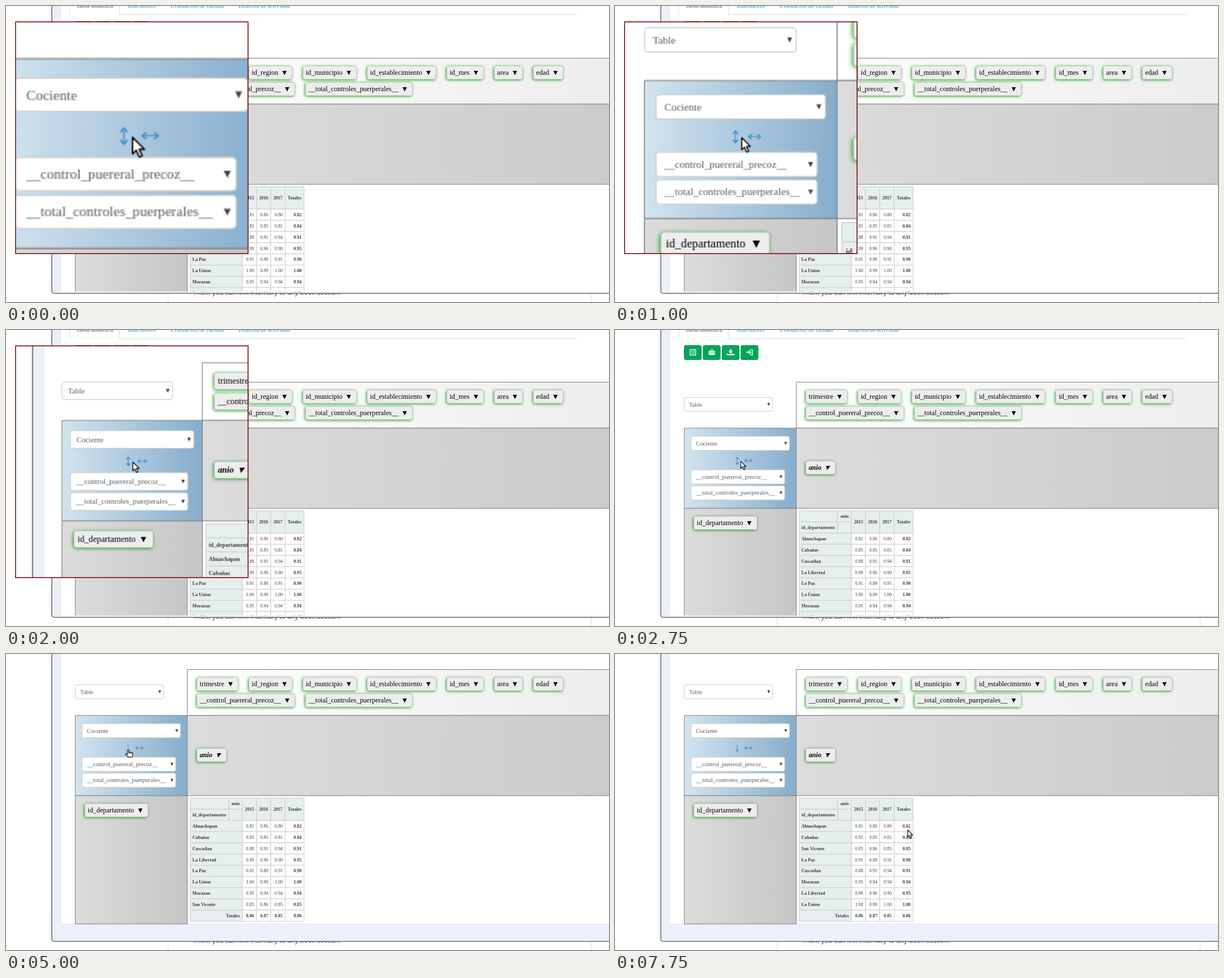
Write an HTML page with a canvas that moves like this. It is 1066 by 525 pixels and loops after 8 s.

```html
<!DOCTYPE html>
<html lang="es">
<head>
<meta charset="utf-8">
<title>Tabla dinámica</title>
<style>
  html, body { margin: 0; width: 100%; height: 100%; overflow: hidden; background: #fff; }
  canvas { display: block; }
</style>
</head>
<body>
<canvas id="stage" width="1066" height="525"></canvas>
<script>
const W = 1066, H = 525, LOOP = 8000;
const SERIF = '"Liberation Serif", "Times New Roman", serif';
const SANS = '"Liberation Sans", Arial, sans-serif';
const view = document.getElementById('stage').getContext('2d');
const page = document.createElement('canvas');
page.width = W;
page.height = H;
const c = page.getContext('2d');

// Each step: start time, then its values
const ZOOM = [[0, 2.366], [500, 2.14], [750, 1.92], [1000, 1.72], [1250, 1.4],
  [2000, 1.253], [2250, 1.1], [2750, 0]];
const POINTER = [[0, 'arrow', 222, 232.3], [3750, 'hand', 222, 228], [5000, 'hand', 210.5, 169],
  [7000, 'arrow', 400.5, 305], [7250, 'arrow', 457, 317], [7500, 'arrow', 500.5, 328.5],
  [7750, 'arrow', 517, 311.5]];

const PILLS = [
  ['trimestre', 'id_region', 'id_municipio', 'id_establecimiento', 'id_mes', 'area', 'edad'],
  ['__control_puereral_precoz__', '__total_controles_puerperales__']
];
const ROWS = [
  ['Ahuachapan', .81, .86, .80, .82], ['Cabañas', .85, .85, .81, .84],
  ['Cuscatlan', .88, .91, .94, .91], ['La Libertad', .99, .96, .90, .95],
  ['La Paz', .91, .88, .91, .90], ['La Union', 1, .99, 1, 1],
  ['Morazan', .95, .94, .94, .94], ['San Vicente', .85, .86, .85, .85]
];
const SORTED = [...ROWS].sort((a, b) => a[4] - b[4]);
const TOTALS = ['Totales', .86, .87, .85, .86];
const COLS = [418, 443, 468, 493.5, 527];

const pick = (steps, t) => steps.filter(s => s[0] <= t).pop();

function text(str, x, y, size, color, style = '', align = 'left', family = SERIF) {
  c.font = `${style} ${size}px ${family}`;
  c.fillStyle = color;
  c.textAlign = align;
  c.fillText(str, x, y);
}

function line(color, width, ...pts) {
  c.strokeStyle = color;
  c.lineWidth = width;
  c.beginPath();
  for (let i = 0; i < pts.length; i += 2) c.lineTo(pts[i], pts[i + 1]);
  c.stroke();
}

function box(x, y, w, h, fill, stroke, r = 0) {
  c.beginPath();
  c.roundRect(x, y, w, h, r);
  c.fillStyle = fill;
  c.fill();
  if (stroke) {
    c.strokeStyle = stroke;
    c.lineWidth = 1;
    c.stroke();
  }
}

function shade(x0, x1, from, to) {
  const g = c.createLinearGradient(x0, 0, x1, 0);
  g.addColorStop(0, from);
  g.addColorStop(1, to);
  return g;
}

function triangle(x, y, w, h, color, slant = 0) {
  c.fillStyle = color;
  c.beginPath();
  c.moveTo(x - w / 2 + slant, y - h / 2);
  c.lineTo(x + w / 2 + slant, y - h / 2);
  c.lineTo(x - slant, y + h / 2);
  c.fill();
}

function pill(label, x, y, style = '') {
  c.font = `${style} 12.2px ${SERIF}`;
  const tw = c.measureText(label).width, w = tw + 30.6;
  c.save();
  c.shadowColor = 'rgba(0,140,0,.95)';
  c.shadowBlur = 5;
  c.shadowOffsetX = -1;
  c.shadowOffsetY = 1;
  box(x + .5, y + .5, w - 1, 23.5, '#ededed', null, 3.5);
  c.restore();
  box(x + .5, y + .5, w - 1, 23.5, '#ededed', 'rgba(170,190,170,.6)', 3.5);
  text(label, x + 5.5, y + 16, 12.2, '#000', style);
  triangle(x + w - 14, y + 12.7, 7.6, 7.6, '#000', style ? 1 : 0);
  return w;
}

function select(label, x, y, w) {
  box(x, y, w, 25, '#fff', '#ccc', 3);
  text(label, x + 8.5, y + 16, 10.7, '#5c5c5c');
  triangle(x + w - 6.7, y + 12.7, 5.2, 5.2, '#444');
}

function sortArrow(x, y, angle, twoWay, faint) {
  c.save();
  c.globalAlpha = faint ? .35 : 1;
  c.translate(x, y);
  c.rotate(angle);
  const blue = '#3f8ec4';
  line(blue, 1.1, -6, 0, 6, 0);
  line(blue, 1.2, 3, -2.6, 6, 0, 3, 2.6);
  if (twoWay) line(blue, 1.2, -3, -2.6, -6, 0, -3, 2.6);
  c.restore();
}

function buttons() {
  const icons = [
    () => {
      c.strokeRect(-5, -5, 10, 10);
      for (let y = -2.5; y < 4; y += 2.5) line('#fff', 1.1, -3.5, y, -2.2, y), line('#fff', 1.1, -1, y, 3.6, y);
    },
    () => {
      box(-5.5, -2.5, 11, 7, '#fff', null, 1);
      c.strokeRect(-2, -4.3, 4, 2.5);
      line('#00a65a', .9, -5.5, 1, 5.5, 1);
    },
    () => {
      box(-1.5, -5.5, 3, 5, '#fff');
      triangle(0, 0, 8, 4.5, '#fff');
      line('#fff', 2.2, -5.5, 2.2, -5.5, 4, 5.5, 4, 5.5, 2.2);
    },
    () => {
      line('#fff', 1.5, 1.5, -4.5, 5, -4.5, 5, 4.5, 1.5, 4.5);
      line('#fff', 2.2, -5.5, 0, 0, 0);
      line('#fff', 1.8, -1, -3, 2, 0, -1, 3);
    }
  ];
  icons.forEach((icon, i) => {
    const x = 122.5 + i * 33.4;
    box(x, 27.5, 30.2, 25, '#00a65a', '#008d4c', 2.5);
    c.save();
    c.translate(x + 15.2, 39.7);
    c.strokeStyle = '#fff';
    c.lineWidth = 1.2;
    icon();
    c.restore();
  });
}

function pivot(rows) {
  const head = '#e6eeee', edge = '#cdcdcd', ink = '#3d3d3d', size = 8.1, rh = 19.87;
  const cell = (x0, y, x1, h, fill) => box(x0, y, x1 - x0, h, fill, edge);
  const top = 320.5, body = top + 2 * rh;
  [[325.5, 394], [394, 418]].forEach(([a, b]) => {
    cell(a, top, b, rh, head);
    cell(a, top + rh, b, rh, head);
  });
  text('anio', 413.3, top + 12.7, size, ink, 'bold', 'right');
  text('id_departamento', 329.5, top + rh + 12.7, size, ink, 'bold');
  ['2015', '2016', '2017', 'Totales'].forEach((name, i) => {
    cell(COLS[i], top, COLS[i + 1], 2 * rh, head);
    text(name, (COLS[i] + COLS[i + 1]) / 2, top + rh + 2.8, size, ink, 'bold', 'center');
  });
  [...rows, TOTALS].forEach((row, r) => {
    const y = body + r * rh, sum = row === TOTALS;
    cell(325.5, y, 418, rh, head);
    text(row[0], sum ? 413.3 : 329.5, y + 12.7, size, ink, 'bold', sum ? 'right' : 'left');
    for (let i = 0; i < 4; i++) {
      cell(COLS[i], y, COLS[i + 1], rh, '#fff');
      text(row[i + 1].toFixed(2), COLS[i + 1] - 4.4, y + 12.7, size, ink,
        sum || i === 3 ? 'bold' : '', 'right');
    }
  });
}

function tabs() {
  line('#ddd', 1, 112.5, 0, 112.5, 15);
  line('#ddd', 1, 200.5, 0, 200.5, 15.5, 1009, 15.5);
  text('Tabla dinámica', 124, 3, 10.7, '#555');
  text('Indicadores', 215, 3, 10.7, '#3c8dbc');
  text('Evaluación de calidad', 291, 3, 10.7, '#3c8dbc');
  text('Bitácora de actividad', 411, 3, 10.7, '#3c8dbc');
}

function content(t) {
  const edge = '#808080';
  box(96.5, -20, 1000, 564, '#fff', '#dfe3ec');
  tabs();
  buttons();

  box(320.5, 92.5, 800, 81.5, shade(320, 1120, '#fff', '#ebebeb'), edge);
  box(320.5, 174, 800, 142.3, shade(320, 1120, '#dcdcdc', '#cacaca'), edge);
  box(122.5, 174, 198, 142.3, shade(122, 320, '#d3e4ef', '#86adcc'), edge);
  box(122.5, 316.3, 198, 227.4, shade(122, 320, '#dcdcdc', '#c6c6c6'), edge);

  select('Table', 122.5, 119.5, 156);
  select('Cociente', 134.5, 188.5, 174);
  select('__control_puereral_precoz__', 134.5, 248, 165.5);
  select('__total_controles_puerperales__', 134.5, 276.3, 165.5);

  const sorted = t >= 6500;
  sortArrow(216, 232, Math.PI / 2, !sorted, t >= 5000 && t < 7000);
  sortArrow(235.7, 231.7, 0, true, t >= 3750 && t < 5000);

  PILLS.forEach((row, r) => {
    let x = 337;
    for (const label of row) x += pill(label, x, 106 + r * 29) + 18.1;
  });
  pill('anio', 337, 232, 'italic bold');
  pill('id_departamento', 139, 330);

  c.save();
  if (t >= 6500 && t < 6750) c.globalAlpha = .5;
  pivot(t < 6750 ? ROWS : SORTED);
  c.restore();
}

function pointer(kind, x, y) {
  const shape = kind === 'arrow'
    ? 'M.5 .5V13L3.3 10.4 5.6 15.5 7.8 14.5 5.5 9.6H9.4Z'
    : 'M4.5 9V1.6Q5.6 0 6.8 1.6V5.2Q8 4.4 9 5.6 10.2 4.8 11.2 6.1 12.6 5.4 13.5 7V10.5L12.4 13.8H5.6L1 9Q1.2 7.2 2.8 7.6Z';
  c.save();
  c.translate(x, y);
  const path = new Path2D(shape);
  c.fillStyle = '#fff';
  c.fill(path);
  c.strokeStyle = '#000';
  c.lineWidth = 1.1;
  c.lineJoin = 'round';
  c.stroke(path);
  if (kind === 'hand') {
    line('#000', .8, 6.8, 5, 6.8, 8);
    line('#000', .8, 9, 5.6, 9, 8);
    line('#000', .8, 11.2, 6.1, 11.2, 8.2);
  }
  c.restore();
}

function drawPage(t) {
  box(0, 0, W, H, '#fff');
  line('#ddd', 1, 286.5, 505, 286.5, H);
  line('#ddd', 1, 1034.5, 505, 1034.5, H);
  text('Then, you can link internally to any book section.', 330, 512.3, 12.15, '#333', '', 'left', SANS);
  box(80.5, -10, 1010, 520, '#ecf0f8', '#aaa', 4);
  box(81.2, -10, 1010, 519.5, '#ecf0f8', '#555', 4);

  c.save();
  c.beginPath();
  c.rect(82, 0, W, 506.5);
  c.clip();
  if (t >= 5000) c.translate(0, -65);
  content(t);
  c.restore();

  const [, kind, x, y] = pick(POINTER, t);
  pointer(kind, x, y);
}

function lens(s) {
  view.save();
  view.beginPath();
  view.rect(17, 28, 411, 411);
  view.clip();
  view.imageSmoothingQuality = 'high';
  view.translate(224.9 - 223 * s, 235.5 - 234 * s);
  view.scale(s, s);
  view.drawImage(page, 0, 0);
  view.restore();
  view.strokeStyle = '#7b0d0d';
  view.lineWidth = 1.6;
  view.strokeRect(16.9, 28.2, 411, 411);
}

function frame(now) {
  const t = now % LOOP;
  drawPage(t);
  view.drawImage(page, 0, 0);
  const zoom = pick(ZOOM, t)[1];
  if (zoom) lens(zoom);
  requestAnimationFrame(frame);
}

frame(0);
</script>
</body>
</html>
```
